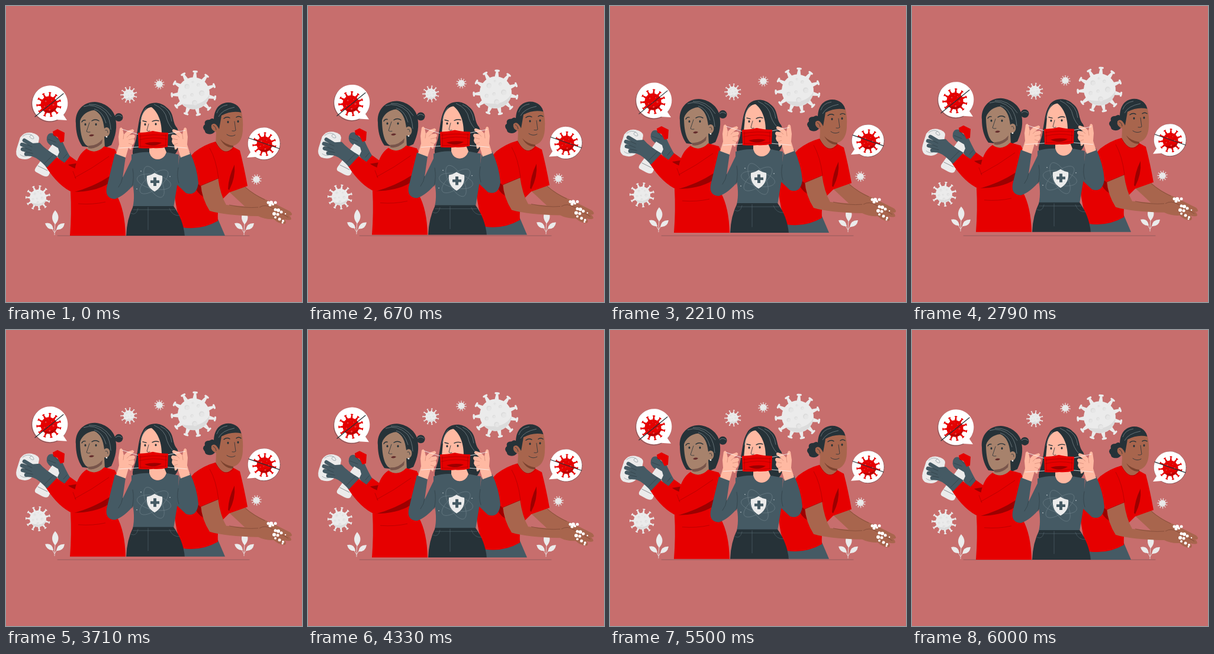
An HTML page for the animation above (6.04 s loop, 500 by 500 pixels).

```html
<!DOCTYPE html>
<html lang="en">
<head>
<meta charset="utf-8">
<title>Stay protected</title>
<style>
html, body { margin: 0; width: 100%; height: 100%; overflow: hidden; background: #c76e6d; }
svg { display: block; width: 100vw; height: 100vh; }
.red { fill: #e60000; } .deep { fill: #9c0000; }
.slate { fill: #455a64; } .dark { fill: #263238; }
.pale { fill: #ebebeb; } .white { fill: #fff; }
.tan { fill: #a7826c; } .peach { fill: #ffb9a2; } .brown { fill: #a8654d; }
.line { fill: none; stroke: #263238; stroke-width: .8; stroke-linecap: round; stroke-linejoin: round; }
.brow { stroke-width: 1.4; }
.fine { stroke-width: .5; }
.slash { stroke-width: 1.2; }
.light { stroke: #61747d; }
.ground { opacity: .6; }
.finger { fill: none; stroke: #455a64; stroke-width: 6.5; stroke-linecap: round; }
.seam { fill: none; stroke: #a00000; stroke-width: .6; }
.strand { fill: none; stroke: #a3b0b5; stroke-width: .5; }
.string { fill: none; stroke: #f5f5f5; stroke-width: .8; }
</style>
</head>
<body>
<svg viewBox="0 0 500 500">
<path class="line fine ground" d="M87 388H411"/>
<g id="scene">
  <g id="plants"></g>
  <g id="germs"></g>

  <!-- speech bubbles -->
  <circle class="line fine" cx="73.600" cy="165.500" r="30"/>
  <path class="white" d="M97 184L103 193L86 192A30 30 0 1 1 97 184Z"/>
  <circle class="line fine" cx="436" cy="232.700" r="27"/>
  <path class="white" d="M413 247L407 256L421 255A27 27 0 1 0 413 247Z"/>
  <g id="badGerms"></g>
  <path class="line slash" d="M49 187L97 148M410 223L462 241"/>

  <!-- cleaning woman -->
  <g>
    <circle class="dark" cx="190.500" cy="188" r="7"/>
    <path class="dark" d="M118 198C116 179 129 162 150 162C166 163 180 173 184 186C189 204 185 220 178 235L164 241L129 237C121 226 118 212 118 198Z"/>
    <path class="tan" d="M125 194C129 183 138 177 149 176C160 181 164 191 166 207C171 202 177 207 175 215C173 221 168 222 166 220L167 241Q150 252 136 242L139 237C130 234 125 217 125 194Z"/>
    <path fill="#78554b" d="M139 236Q153 237 163 225L162 232Q150 243 139 240Z"/>
    <path class="strand" d="M131 170Q150 163 168 180Q176 191 177 209M140 166Q163 164 178 187M149 174Q163 177 169 198M185 187Q190 182 196 187"/>
    <path class="line brow" d="M128 196Q130 192 134 193M145 194Q151 190 157 194"/>
    <path class="line" d="M141 197Q138 206 136 212Q138 214 142 213M168 210Q172 208 172 214"/>
    <ellipse class="dark" cx="134" cy="200" rx="1.500" ry="2"/>
    <ellipse class="dark" cx="152" cy="200" rx="1.500" ry="2"/>
    <path fill="#642c2c" d="M140 219Q144 215 149 218Q145 222 140 219Z"/>
    <circle class="pale" cx="170" cy="221" r="1.300"/>

    <path class="red" d="M106 252L124 265L116 287L94 268Z"/>
    <path class="deep" d="M105 268L124 265L117 280Z"/>
    <path class="red" d="M136 241Q151 252 166 237L184 242Q202 275 187 320Q201 345 202 388H108Q111 350 109 314L117 272Q122 250 136 241Z"/>
    <path class="deep" d="M113 314Q150 305 176 286L173 300Q150 314 113 314Z"/>
    <path class="slate" d="M69 222Q71 213 79 215L86 222L95 228Q100 240 108 254L97 267Q86 257 84 244L76 236Q67 230 69 222Z"/>
    <path class="pale" d="M78 234L88 240L90 247L72 286Q69 290 61 286L50 280Q47 277 51 272Z"/>
    <path class="red" d="M79 212L87 208L99 214L98 229L92 231L87 221L80 219Z"/>
    <path class="finger" d="M73 221L82 226M74 228L83 232"/>
    <path class="line fine" d="M71 225L84 230M80 217L88 226M97 257L103 250M54 270L70 278"/>
    <path class="pale" d="M24 222Q31 212 43 214Q56 217 56 224L53 240L43 255Q35 262 22 257Q15 252 18 241Z"/>
    <path class="line fine light" d="M28 220Q37 213 45 219Q50 226 43 224Q37 220 43 218M24 251Q30 256 36 253"/>
    <path class="red" d="M84 254Q101 268 120 276L155 252Q178 238 187 249Q194 275 176 287Q148 305 113 315Q89 305 67 271Z"/>
    <path class="seam" d="M116 290Q145 275 174 254M113 279L118 292M122 334Q146 336 168 331"/>
    <path class="slate" d="M43 232L57 231Q66 242 87 254L69 273Q59 262 51 257L42 253Z"/>
    <path class="finger" d="M46 236L31 227M46 241L27 234M46 246L28 242M48 251L34 250"/>
    <path class="line fine" d="M29 231L44 238M28 238L43 244M31 246L45 249M65 266L80 251"/>
  </g>

  <!-- hand washing man -->
  <g>
    <path class="slate" d="M297 370L358 360L370 388H302Z"/>
    <path class="dark" d="M353 212C348 219 336 217 336 211Q330 204 336 200Q334 192 344 192Q350 187 354 195Z"/>
    <path class="dark" d="M352 205C348 179 357 164 375 163C388 163 397 171 398 183L367 187L361 213Z"/>
    <path class="brown" d="M364 185Q381 176 398 180Q401 194 400 207C400 226 392 234 384 236V242Q370 256 354 236L355 213Q345 209 347 201Q353 194 360 208Z"/>
    <path fill="#7c432f" d="M362 225Q370 234 384 236V239Q370 240 362 225Z"/>
    <path class="line brow" d="M368 190Q373 186 378 189M389 188Q393 185 397 188"/>
    <path class="line" d="M386 195L388 210Q386 212 382 211M373 217Q380 222 387 218M350 202Q354 203 355 209"/>
    <ellipse class="dark" cx="375" cy="196" rx="1.500" ry="2"/>
    <ellipse class="dark" cx="392" cy="195" rx="1.500" ry="2"/>
    <path class="strand" d="M356 181Q360 169 374 167M359 187Q365 175 386 171"/>

    <path class="brown" d="M376 313L403 304Q420 320 446 330L480 347Q486 353 480 354L440 345L406 341Z"/>
    <path class="red" d="M354 229Q368 257 384 238L395 244Q402 271 408 304L377 315L360 332Q357 347 358 363Q330 379 298 374Q286 345 284 310Q296 270 318 247Q335 234 354 229Z"/>
    <path class="deep" d="M386 268Q388 290 377 311L375 309Q376 288 386 268ZM316 300L329 302Q330 313 333 322Q323 317 316 300Z"/>
    <path class="brown" d="M329 301L358 290Q362 319 372 336L425 340Q441 332 453 338L471 349Q482 355 482 360Q479 363 470 360Q475 366 471 368Q462 369 452 360Q438 361 426 355Q371 354 344 346Q331 326 329 301Z"/>
    <path class="red" d="M327 247Q349 240 353 261L359 291L328 304L316 285Z"/>
    <path class="seam" d="M344 240Q355 259 359 291L328 304M354 230Q369 257 385 239"/>
    <path fill="none" stroke="#73402f" stroke-width=".6" d="M377 336Q404 342 426 340M428 340Q438 334 449 341L477 357M404 306Q419 319 437 327M451 354L467 363"/>
    <g class="white" id="foam"></g>
  </g>

  <!-- mask woman -->
  <g>
    <path class="dark" d="M232 174C239 161 260 160 271 171C285 181 280 196 289 206C296 221 294 243 284 252H215C211 243 220 232 221 216C224 202 224 187 232 174Z"/>
    <path class="peach" d="M228 195C229 181 237 171 246 171C254 177 263 191 263 214L246 227L226 216Z"/>
    <path class="strand" d="M250 166Q269 174 272 192Q276 204 286 213M261 168Q278 175 280 195M237 172Q229 181 227 196"/>
    <path class="line brow" d="M231 194L237 195.500M247 195Q252 192 258 194"/>
    <path class="line" d="M241 199L238 210Q240 213 243 211"/>
    <ellipse class="dark" cx="235" cy="200" rx="1.500" ry="2"/>
    <ellipse class="dark" cx="253" cy="199.500" rx="1.500" ry="2"/>
    <path class="slate" d="M212 251Q228 246 242 247C246 263 266 263 271 247L292 251L290 298L283 340H214Q219 320 212 290Z"/>
    <path class="peach" d="M242 235H266L271 247C266 263 246 263 242 247Z"/>
    <path class="dark" d="M215 338H283Q299 360 302 388H203Q204 360 215 338Z"/>
    <path class="line fine light" d="M215 344H286M240 340V378M211 350Q220 355 223 342M276 342Q281 355 293 354"/>
    <g id="orbits"></g>
    <path class="pale" d="M251 282Q257 286 264 287Q266 305 251 313.500Q236 305 238 287Q245 286 251 282Z"/>
    <path class="slate" d="M249 289.500H254V294.500H259V299H254V304H249V299H244V294.500H249Z"/>
    <path class="slate" d="M184 249L202 255L197 290L213 257L218 299Q200 321 184 326Q167 325 170 307Z"/>
    <path class="slate" d="M293 253L311 247Q323 274 325 299Q322 322 304 316L287 300Z"/>
    <path class="line fine" d="M197 289Q196 298 190 306M214 275Q217 290 213 306M291 273Q288 288 292 299"/>
    <g id="hands"></g>
    <path class="string" d="M224 217L196 208M224 238L191 240M273 216L303 210M273 237L306 240"/>
    <path class="red" d="M223 214Q237 214 248 211Q260 214 274 214L273 238Q260 241 249 240Q237 241 224 240Z"/>
    <path class="deep" d="M234 232Q249 228 263 231Q249 240 234 232Z"/>
    <path class="seam" d="M225 220Q249 216 272 219M225 226Q249 220 272 225M227 217V238M270 217V236M226 237Q249 239 271 235"/>
  </g>
</g>
</svg>
<script>
const LOOP = 6040, LIFT = 6.7;
const $ = id => document.getElementById(id);

function add(parent, tag, attrs) {
  const node = document.createElementNS('http://www.w3.org/2000/svg', tag);
  for (const key in attrs) node.setAttribute(key, attrs[key]);
  return parent.appendChild(node);
}

function germ(parent, x, y, r, reach, spikes, turn, fill, shade, light) {
  const g = add(parent, 'g', { transform: `translate(${x} ${y}) rotate(${turn})` });
  const w = r * .1, cap = r * .1;
  for (let i = 0; i < spikes; i++) {
    const spike = add(g, 'g', { transform: `rotate(${i * 360 / spikes})` });
    add(spike, 'path', { d: `M${-w * 1.4} ${-r * .9}L${-w * .5} ${-reach}H${w * .5}L${w * 1.4} ${-r * .9}Z`, fill });
    add(spike, 'path', { d: `M${-cap} ${-reach + w * .6}H${cap}`, stroke: fill, 'stroke-width': w * 1.2, 'stroke-linecap': 'round' });
  }
  add(g, 'circle', { r, fill });
  add(g, 'path', { d: `M${-r * .7} ${r * .7}A${r} ${r} 0 0 0 ${r} 0Q${r * .6} ${r * .85} ${-r * .7} ${r * .7}Z`, fill: shade });
  const spots = [[-.45, -.4, .15], [.25, -.55, .1], [.5, -.05, .17], [-.1, .1, .1], [-.55, .25, .12], [.1, .58, .16], [-.1, -.7, .07]];
  for (const [px, py, s] of spots) {
    add(g, 'circle', { cx: px * r, cy: py * r, r: s * r, fill: shade });
    add(g, 'circle', { cx: px * r + s * r * .2, cy: py * r + s * r * .2, r: s * r * .8, fill: light });
  }
}

for (const [x, y, r, reach, spikes, turn] of [
  [317, 147.5, 27, 38.5, 11, 4], [207.5, 150, 9, 14, 11, 8], [259, 132, 5.5, 8.5, 11, 0],
  [54, 324, 14, 21, 11, 10], [423, 293, 5.5, 8.5, 11, 12]
]) germ($('germs'), x, y, r, reach, spikes, turn, '#ebebeb', '#dcdcdc', '#e6e6e6');

for (const [x, y, r, reach, turn] of [[72.5, 166.5, 14, 21, 5], [436.5, 233.5, 13, 20, 3]])
  germ($('badGerms'), x, y, r, reach, 11, turn, '#e60000', '#b80000', '#ee3030');

for (const x of [82, 402]) {
  const plant = add($('plants'), 'g', { transform: `translate(${x} 0)`, class: 'pale' });
  add(plant, 'path', { d: 'M0 387Q0 376 1 366M0 383Q-3 376 -9 372M0 383Q3 376 10 373', fill: 'none', stroke: '#ebebeb', 'stroke-width': .8 });
  add(plant, 'path', { d: 'M1 369Q-9 357 1 345Q12 357 1 369Z' });
  add(plant, 'path', { d: 'M-2 377Q-13 378 -16 367Q-4 364 -2 377Z' });
  add(plant, 'path', { d: 'M3 378Q5 366 17 367Q15 379 3 378Z' });
}

for (const turn of [12, -38, 62])
  add($('orbits'), 'ellipse', { rx: 29, ry: 12, fill: 'none', stroke: '#7d8f97', 'stroke-width': .45, transform: `translate(250 297) rotate(${turn})` });
for (const [cx, cy] of [[221, 309], [277, 288], [228, 279]])
  add($('orbits'), 'circle', { cx, cy, r: .8, fill: '#c8d2d6' });

for (const transform of ['', 'translate(497 0) scale(-1 1)']) {
  const hand = add($('hands'), 'g', { transform });
  add(hand, 'path', { class: 'peach', d: 'M186 250L191 234L190 221L192 207Q195 203 197 208L199 217L205 211L214 208Q219 211 213 214L208 218L216 217Q220 220 216 224L217 229Q216 233 213 235L212 242Q210 244 207 239L202 256Z' });
  add(hand, 'path', { fill: 'none', stroke: '#c97e6c', 'stroke-width': .6, d: 'M199 217L198 225M208 218L204 222M216 224L207 226M213 234L207 232' });
}

for (const [cx, cy, r] of [
  [443, 332, 2.5], [448, 332, 3], [455, 332, 2.5], [446, 336, 2.5], [451, 335, 2],
  [455, 344, 2.5], [460, 345, 3], [465, 348, 2.5], [453, 351, 3], [459, 352, 2.5],
  [455, 357, 2], [462, 360, 2.5], [468, 363, 2], [467, 366, 1.5], [472, 351, 1.2]
]) add($('foam'), 'circle', { cx, cy, r });

function render(ms) {
  const phase = ms % LOOP / LOOP;
  const rise = 1 - Math.abs(1 - 2 * phase);
  $('scene').setAttribute('transform', `translate(0 ${(-LIFT * rise).toFixed(3)})`);
}

const start = performance.now();
function tick() {
  render(performance.now() - start);
  requestAnimationFrame(tick);
}
render(0);
requestAnimationFrame(tick);
</script>
</body>
</html>
```
